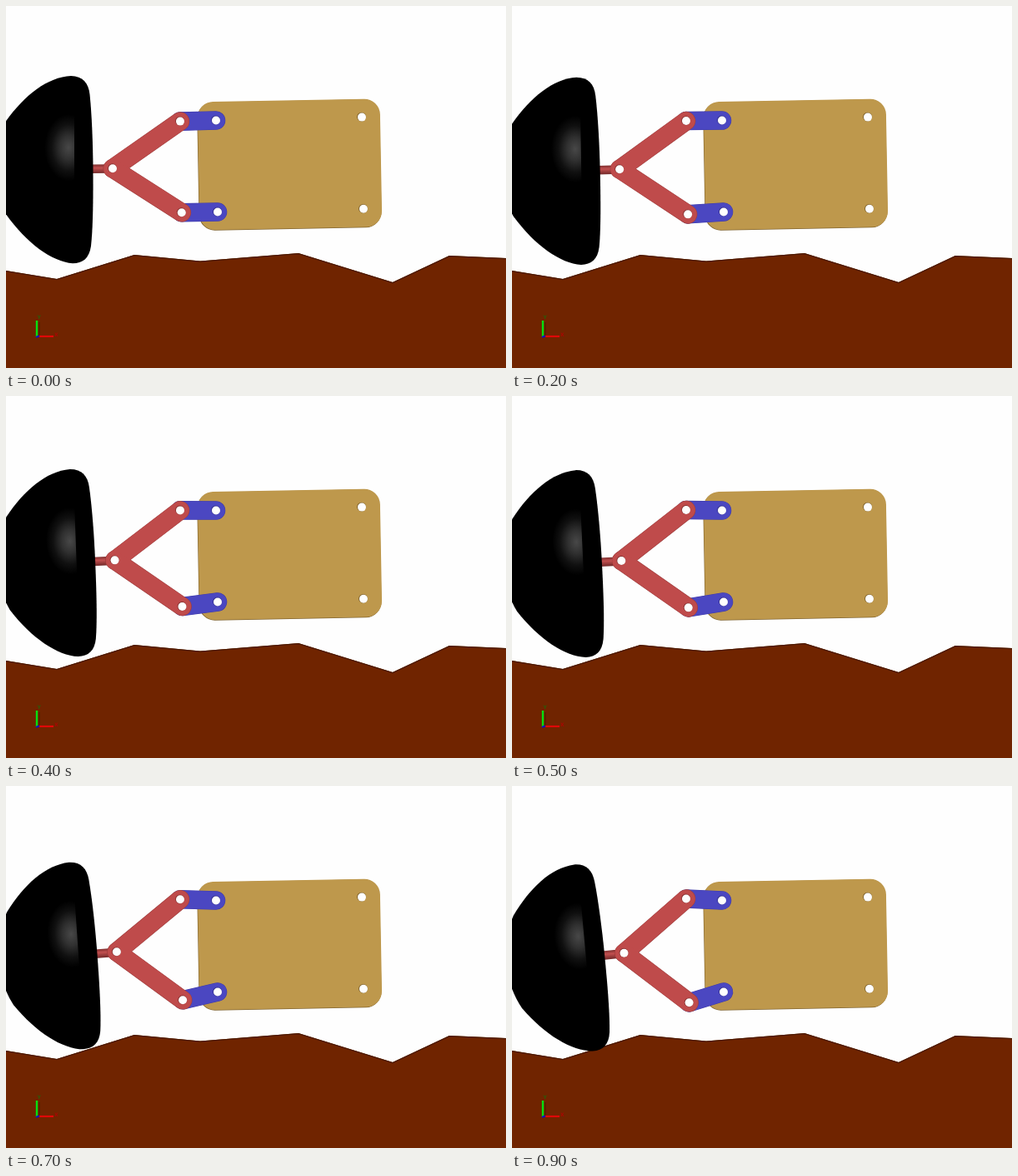
An HTML page with a canvas that plays this animation: 600x435 px, repeating every 1000 ms.

```html
<!DOCTYPE html>
<html lang="en">
<head>
<meta charset="utf-8">
<title>Wheel suspension</title>
<style>
html, body { margin: 0; width: 100%; height: 100%; overflow: hidden; background: #fefefe; }
canvas { display: block; }
</style>
</head>
<body>
<canvas id="stage" width="600" height="435"></canvas>
<script>
const ctx = document.getElementById('stage').getContext('2d');
const STEP = 100, STEPS = 10;
const RED = '#bf4b4b', BLUE = '#4b47c1', WHITE = '#fefefe';
const TERRAIN = [[0, 318], [61, 328], [154, 299], [233, 306.5], [351, 297], [464, 332], [532, 300], [600, 303]];
const UPPER = [252, 137.5], LOWER = [254, 247.5];
const WHEEL = new Path2D('M78 83.7C92 84 99 92 100.5 106C103 130 104.3 165 104.5 195' +
  'C104.7 230 104.5 265 102 288C100 303 92 309 80 309C55 307 25 285 0 250' +
  'C-19 215 -19 172 0 138C22 107 50 85 78 83.7Z');

const mix = (a, b, p) => a + (b - a) * p;
const between = (a, b, p) => [mix(a[0], b[0], p), mix(a[1], b[1], p)];

function line(pts, width, color, cap = 'butt') {
  ctx.beginPath();
  pts.forEach(([x, y]) => ctx.lineTo(x, y));
  ctx.lineWidth = width;
  ctx.lineCap = cap;
  ctx.strokeStyle = color;
  ctx.stroke();
}

function disc([x, y], r, color) {
  ctx.beginPath();
  ctx.arc(x, y, r, 0, Math.PI * 2);
  ctx.fillStyle = color;
  ctx.fill();
}

function hole([x, y], rim) {
  disc([x - 0.4, y - 0.4], 5.5, rim);
  disc([x, y], 5, WHITE);
}

function bar(a, b, color, edge) {
  line([a, b], 22.6, edge, 'round');
  line([a, b], 21.6, color, 'round');
}

function label(text, x, y, color) {
  ctx.font = 'bold 6px "DejaVu Sans", sans-serif';
  ctx.fillStyle = color;
  ctx.fillText(text, x, y);
}

function drawGround() {
  ctx.beginPath();
  TERRAIN.forEach(([x, y]) => ctx.lineTo(x, y));
  ctx.lineTo(600, 435);
  ctx.lineTo(0, 435);
  ctx.fillStyle = '#702400';
  ctx.fill();
  line(TERRAIN.map(([x, y]) => [x, y + 0.6]), 1.2, '#4a1800');
}

function drawAxes() {
  line([[37, 378], [37, 398]], 2.4, '#00e010');
  line([[40, 380], [40, 396]], 1, '#4a1a00');
  line([[40, 397], [57, 397]], 2.2, '#e00808');
  line([[36, 398], [40, 396.5]], 2.4, '#1010c0');
  label('Y', 37.5, 376, '#2f5a08');
  label('X', 58, 397, '#a80800');
}

function drawPlate() {
  ctx.save();
  ctx.translate(340.5, 190.3);
  ctx.rotate(-0.0185);
  for (const [dx, dy, color] of [[-0.6, 0.7, '#80642f'], [0, 0, '#be984c']]) {
    ctx.beginPath();
    ctx.roundRect(-109.5 + dx, -77 + dy, 219, 154, 19);
    ctx.fillStyle = color;
    ctx.fill();
  }
  ctx.restore();
  hole([427, 133.6], '#80642f');
  hole([429, 243.8], '#80642f');
}

function drawWheel(hub, p) {
  ctx.save();
  ctx.translate(...hub);
  ctx.rotate(-0.091 * p);
  ctx.translate(-128, -195);

  const shaft = ctx.createLinearGradient(0, 190, 0, 201);
  shaft.addColorStop(0, '#7c2e2e');
  shaft.addColorStop(0.4, '#c25050');
  shaft.addColorStop(1, '#702828');
  line([[102, 195.6], [128, 195.4]], 10.5, shaft);

  ctx.fillStyle = '#000';
  ctx.fill(WHEEL);

  // soft sheen ending at a facet edge on the right
  ctx.beginPath();
  ctx.rect(30, 110, 52, 110);
  ctx.clip();
  ctx.translate(75, 170);
  ctx.scale(0.72, 1);
  const sheen = ctx.createRadialGradient(0, 0, 0, 0, 0, 40);
  sheen.addColorStop(0, '#484848');
  sheen.addColorStop(0.35, '#303030');
  sheen.addColorStop(0.7, '#101010');
  sheen.addColorStop(1, '#000');
  disc([0, 0], 40, sheen);
  ctx.restore();
}

function draw(p) {
  const hub = between([128, 195.2], [134.5, 200.7], p);
  const top = between([209, 138.6], [209, 135.5], p);
  const low = between([210.8, 248.2], [212.6, 260.3], p);

  ctx.fillStyle = WHITE;
  ctx.fillRect(0, 0, 600, 435);
  drawGround();
  drawAxes();
  drawPlate();
  drawWheel(hub, p);

  bar(top, UPPER, BLUE, '#3f3ba6');
  bar(low, LOWER, BLUE, '#3f3ba6');
  line([hub, top], 22.6, '#9c3c3c', 'round');
  line([hub, low], 22.6, '#9c3c3c', 'round');
  line([hub, top], 21.6, RED, 'round');
  line([hub, low], 21.6, RED, 'round');
  [hub, top, low].forEach(pt => hole(pt, '#873232'));
  [UPPER, LOWER].forEach(pt => hole(pt, '#34308e'));
}

function tick() {
  const step = Math.floor(performance.now() / STEP) % STEPS;
  draw(Math.pow(step / (STEPS - 1), 1.15));
  requestAnimationFrame(tick);
}
tick();
</script>
</body>
</html>
```
